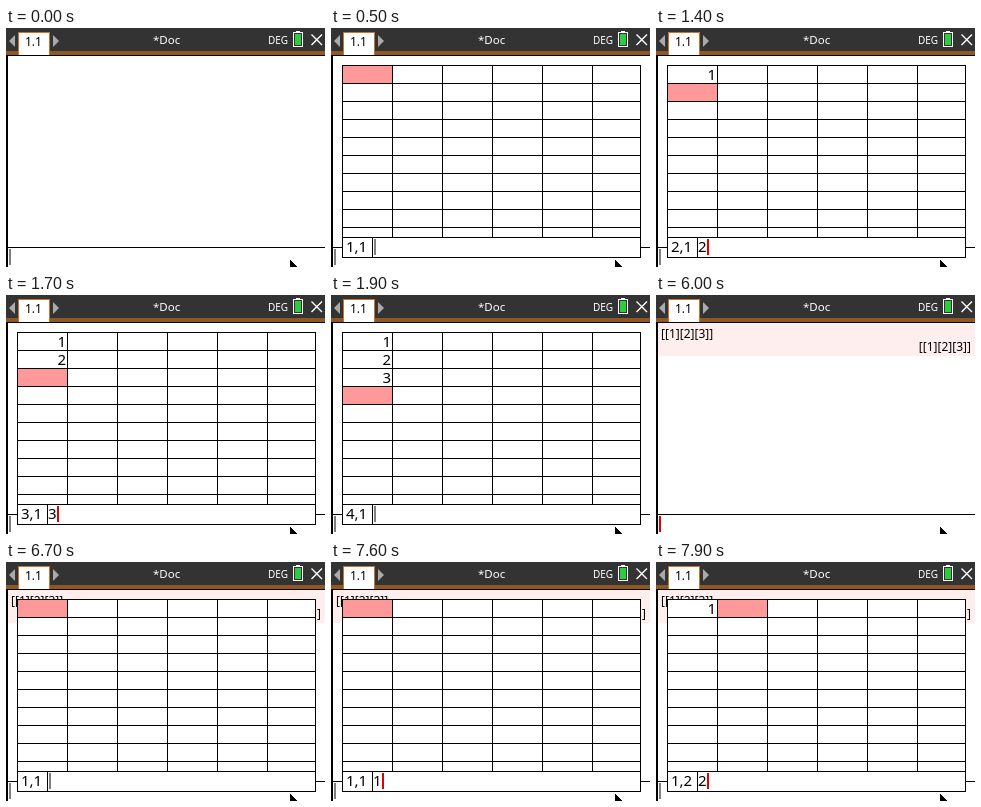
Recreate the animation shown at these times as an HTML page. Size 319 by 239 pixels, loop 8000 ms.

```html
<!DOCTYPE html>
<html lang="en">
<head>
<meta charset="utf-8">
<title>Matrix entry</title>
<style>
  html, body { margin: 0; width: 100%; height: 100%; overflow: hidden; background: #fff; }
  svg { display: block; width: 100%; height: 100%; }
  text { font: 12px "Noto Sans", "Open Sans", sans-serif; white-space: pre; }
  .big text, text.big { font-size: 15px; }
  .end { text-anchor: end; }
</style>
</head>
<body>
<svg viewBox="0 0 319 239" shape-rendering="crispEdges">
  <rect width="319" height="239" fill="#fff"/>

  <!-- title bar -->
  <rect width="319" height="23" fill="#333"/>
  <rect y="23" width="319" height="4" fill="#8f5724"/>
  <rect x="12" y="4" width="32" height="23" fill="#c4752f"/>
  <rect x="13" y="5" width="30" height="22" fill="#fff"/>
  <g fill="#aaa" shape-rendering="auto">
    <path d="M9 7V19L3 13Z"/>
    <path d="M47 7V19L53 13Z"/>
  </g>
  <text x="19" y="18">1.1</text>
  <g fill="#fff">
    <text x="147" y="16" style="font-size:11.5px">*Doc</text>
    <text x="262" y="16" style="font-size:10px">DEG</text>
  </g>
  <rect x="290" y="3" width="4" height="2" fill="#fff"/>
  <rect x="287" y="4" width="10" height="15" fill="#fff"/>
  <rect x="288" y="5" width="8" height="13" fill="#333"/>
  <rect x="289" y="6" width="6" height="11" fill="#2fcc40"/>
  <path d="M305.5 6.5L316 17M316 6.5L305.5 17" stroke="#fff" stroke-width="1.4" shape-rendering="auto"/>

  <!-- calculator page -->
  <path d="M0 27H319V28H2V239H0Z"/>
  <g id="history">
    <rect id="band" x="2" y="28" width="317" height="33"/>
    <text x="5" y="43">[[1][2][3]]</text>
    <text class="end" x="315" y="56">[[1][2][3]]</text>
  </g>
  <rect x="2" y="219" width="317" height="1"/>
  <rect id="pageCaret" x="3" y="221" width="2" height="16"/>

  <!-- matrix editor -->
  <g id="editor" class="big">
    <rect x="11" y="37" width="299" height="193" fill="#fff"/>
    <rect id="selected" width="49" height="17" fill="#f99"/>
    <path id="lines" fill="none" stroke="#000"/>
    <g id="values" class="end"></g>
    <text id="position" x="15" y="224"></text>
    <text id="typed" x="42" y="224"></text>
    <rect id="editCaret" y="211" width="2" height="16"/>
  </g>

  <path d="M284 232V239H291V238Z"/>
</svg>
<script>
const LOOP = 8000, CELL_W = 50, CELL_H = 18, LEFT = 11, TOP = 37;
const GREY = '#808080', RED = '#e00000';
const $ = id => document.getElementById(id);

// at: ms; cell: selected [row, column] or none; values: column of entered numbers
const steps = [
  { at: 0 },
  { at: 500, cell: [1, 1] },
  { at: 1200, cell: [1, 1], typed: '1' },
  { at: 1300, cell: [2, 1], values: [1] },
  { at: 1400, cell: [2, 1], values: [1], typed: '2' },
  { at: 1600, cell: [3, 1], values: [1, 2] },
  { at: 1700, cell: [3, 1], values: [1, 2], typed: '3' },
  { at: 1900, cell: [4, 1], values: [1, 2, 3] },
  { at: 2900, band: '#f99' },
  { at: 6000, band: '#fee', caret: RED },
  { at: 6700, band: '#fee', cell: [1, 1] },
  { at: 7600, band: '#fee', cell: [1, 1], typed: '1' },
  { at: 7800, band: '#fee', cell: [1, 2], values: [1] },
  { at: 7900, band: '#fee', cell: [1, 2], values: [1], typed: '2' }
];

function gridPath() {
  let d = 'M11.5 37.5H309.5V229.5H11.5ZM11 209.5H310M41.5 209V230';
  for (let col = 1; col < 6; col++) d += `M${LEFT + col * CELL_W + .5} 37V209`;
  for (let row = 1; row < 10; row++) d += `M11 ${TOP + row * CELL_H + .5}H310`;
  return d;
}

function set(id, attributes) {
  for (const [name, value] of Object.entries(attributes)) $(id).setAttribute(name, value);
}

function show(id, visible) {
  $(id).style.display = visible ? '' : 'none';
}

function render({ cell, values = [], typed = '', band, caret = GREY }) {
  show('history', band);
  show('editor', cell);
  set('band', { fill: band || 'none' });
  set('pageCaret', { fill: caret });
  if (!cell) return;

  const [row, col] = cell;
  set('selected', { x: LEFT + 1 + (col - 1) * CELL_W, y: TOP + 1 + (row - 1) * CELL_H });
  $('position').textContent = cell.join(',');
  $('typed').textContent = typed;
  set('editCaret', { x: typed ? 51 : 43, fill: typed ? RED : GREY });
  $('values').innerHTML = values.map((value, i) =>
    `<text x="60" y="${TOP + i * CELL_H + 15}">${value}</text>`).join('');
}

set('lines', { d: gridPath() });
const start = performance.now();
let current;

function tick() {
  const time = (performance.now() - start) % LOOP;
  const step = steps.findLast(s => s.at <= time) || steps[0];
  if (step !== current) render(current = step);
  requestAnimationFrame(tick);
}
tick();
</script>
</body>
</html>
```
